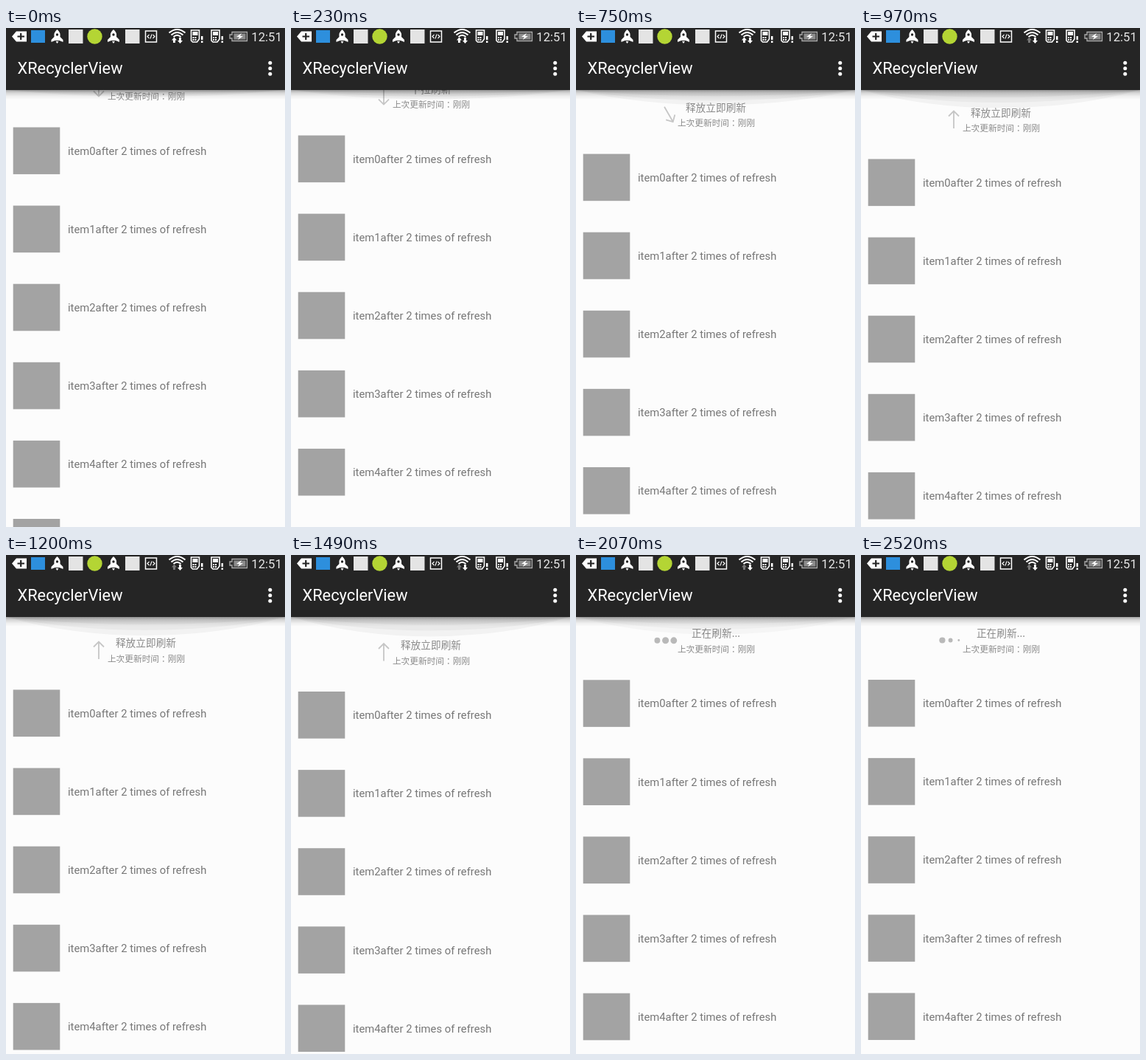
These frames come from a looping animation (379x676 px, 2.56 s). An HTML page:

```html
<!DOCTYPE html>
<html lang="zh-Hant">
<head>
<meta charset="utf-8">
<style>
  html, body { margin: 0; width: 100%; height: 100%; overflow: hidden; background: #fcfcfc; }
  svg { display: block; width: 379px; height: 676px; font-family: Roboto, sans-serif; }
  .header { font-family: "Noto Sans CJK TC", "Noto Sans CJK SC", "Noto Sans CJK", sans-serif; fill: #8a8a8a; text-anchor: middle; }
  .line { fill: none; stroke: #fff; }
</style>
</head>
<body>
<svg viewBox="0 0 379 676">
  <defs>
    <linearGradient id="shade" x2="0" y2="1">
      <stop offset="0" stop-opacity=".34"/>
      <stop offset=".3" stop-opacity=".15"/>
      <stop offset=".65" stop-opacity=".05"/>
      <stop offset="1" stop-opacity="0"/>
    </linearGradient>
    <path id="arc" d="M0 0A379 379 0 0 0 379 0Z"/>
    <g id="rocket">
      <path fill="#fff" d="M0-9Q5-5 4 1L8 5V8L3 6H-3L-8 8V5L-4 1Q-5-5 0-9ZM-2 7H2L0 10Z"/>
      <circle cy="-2" r="1.7" fill="#252525"/>
    </g>
    <g id="sim">
      <path class="line" stroke-width="1.6" d="M1 1H12V13L9 17H3L1 15Z"/>
      <path fill="#fff" d="M3 3H10V8H3ZM3 10H5V12H3ZM6 10H8V12H6ZM3 13H5V15H3ZM6 13H8V15H6ZM14.5 9H17V14H14.5ZM14.5 15.5H17V18H14.5Z"/>
    </g>
  </defs>

  <g id="list">
    <g class="header">
      <text id="state" x="190" y="-58" font-size="13.7"></text>
      <text x="190.5" y="-37.2" font-size="11.7">上次更新時間：刚刚</text>
    </g>
    <path id="arrow" fill="none" stroke="#c6c6c6" stroke-width="1.8" d="M0-12V11.5M-7 4.5L0 11.5L7 4.5"/>
    <g id="dots" fill="#b9b9b9"></g>
    <g id="items" font-size="14.8" fill="#777"></g>
  </g>

  <g id="glow">
    <use href="#arc"/><use href="#arc" transform="scale(1 .7)"/><use href="#arc" transform="scale(1 .4)"/>
  </g>
  <rect y="84" width="379" height="13" fill="url(#shade)"/>
  <rect width="379" height="84" fill="#252525"/>
  <text x="15.5" y="62.4" font-size="21.8" fill="#fff">XRecyclerView</text>
  <g fill="#fff">
    <circle cx="358.8" cy="47.2" r="2.5"/><circle cx="358.8" cy="54.7" r="2.5"/><circle cx="358.8" cy="62.2" r="2.5"/>
  </g>

  <path fill="#fff" d="M8 11.5L14 4.5H28V18.5H14Z"/>
  <path stroke="#252525" stroke-width="2.2" d="M15.5 11.5H25M20.2 7V16"/>
  <rect x="34" y="3" width="19" height="17" fill="#2d8fdd"/>
  <use href="#rocket" x="69.5" y="11"/>
  <rect x="85" y="2" width="19.5" height="19" fill="#e4e4e4"/>
  <circle cx="120.5" cy="11.5" r="10.2" fill="#b4d534"/>
  <use href="#rocket" x="146" y="11"/>
  <rect x="162" y="2" width="19.5" height="19" fill="#e4e4e4"/>
  <path class="line" stroke-width="1.5" d="M189.5 4H204.5V19H189.5Z"/>
  <path class="line" stroke-width="1.1" d="M194.5 9L192 11.5L194.5 14M199.5 9L202 11.5L199.5 14M198 8.5L196 14.5"/>
  <path class="line" stroke-width="2" d="M221.5 6.5Q232.5-2.5 243.5 6.5M224.5 9.5Q232.5 2.5 240.5 9.5M227.5 12Q232.5 7.5 237.5 12"/>
  <path id="up" d="M228.5 12.5L232 16.5H230V20H227V16.5H225Z"/>
  <path fill="#fff" d="M236.5 21L240 17H238V13H235V17H233Z"/>
  <use href="#sim" x="250.5" y="2"/>
  <use href="#sim" x="278" y="2"/>
  <path fill="#333" stroke="#aaa" stroke-width="1.3" d="M307 5.5H327.5V17.5H307V14H304V9H307Z"/>
  <rect x="309.5" y="7.5" width="16" height="8" fill="#8c8c8c"/>
  <path fill="#fff" d="M320 7L313 12H317L315 16L322 11H318Z"/>
  <text x="333.3" y="18" font-size="16.7" fill="#e6e6e6">12:51</text>
</svg>
<script>
const LOOP = 2560, STEP = 57.3, RELEASE = 1776, READY = 169;
const $ = id => document.getElementById(id);

$('items').innerHTML = [0, 1, 2, 3, 4, 5].map(i => `
  <rect x="9.7" y="${i * 106.1}" width="63.6" height="63.6" fill="#a3a3a3"/>
  <text x="84" y="${i * 106.1 + 37.2}">item${i}after 2 times of refresh</text>`).join('');
$('dots').innerHTML = [0, 1, 2].map(i => `<circle cx="${110.4 + 11.2 * i}" cy="-53.5"/>`).join('');
document.querySelector('.header').lastElementChild.textContent = '上次更新时间：刚刚';
const balls = [...$('dots').children];

// Pairs of time in ms and value
const dragPath = [[0, 134.5], [229, 145.5], [516, 162], [745, 170.6], [974, 177.5], [1318, 185], [1490, 185], [RELEASE, 189.4]];
const glowPath = [[0, .18], [516, .33], [974, .48], [1490, .52], [1834, .63], [2300, .3]];
const clamp = x => Math.min(1, Math.max(0, x));

function along(path, t) {
  const i = path.findIndex(p => p[0] > t);
  if (i < 0) return path[path.length - 1][1];
  const [t0, v0] = path[i - 1], [t1, v1] = path[i];
  return v0 + (v1 - v0) * (t - t0) / (t1 - t0);
}

function draw(now) {
  // The screen refreshes in even steps
  const t = Math.floor((now % LOOP + 7.3) / STEP) * STEP;
  const loading = t >= RELEASE;
  const settle = (1 - Math.cos(Math.PI * clamp((t - RELEASE) / 310))) / 2;
  const top = along(dragPath, t) * (1 - settle) + READY * settle;
  const ready = top > READY;

  $('list').setAttribute('transform', `translate(0 ${top})`);
  $('state').textContent = loading ? '正在刷新...' : ready ? '释放立即刷新' : '下拉刷新';
  $('arrow').setAttribute('transform', `translate(126 -53.5) rotate(${-180 * clamp((t - 715) / 180)})`);
  $('arrow').setAttribute('visibility', loading ? 'hidden' : 'visible');
  $('dots').setAttribute('visibility', loading ? 'visible' : 'hidden');
  balls.forEach((ball, i) =>
    ball.setAttribute('r', 4.6 * (.3 + .7 * Math.abs(Math.cos(Math.PI * (t - 1905 - 120 * i) / 750)))));

  $('glow').setAttribute('transform', `translate(0 84) scale(1 ${along(glowPath, t)})`);
  $('glow').setAttribute('fill-opacity', .04 * clamp((2350 - t) / 450));
  $('up').setAttribute('fill', t < 800 ? '#fff' : '#777');
}

function tick() {
  draw(performance.now());
  requestAnimationFrame(tick);
}
tick();
</script>
</body>
</html>
```
